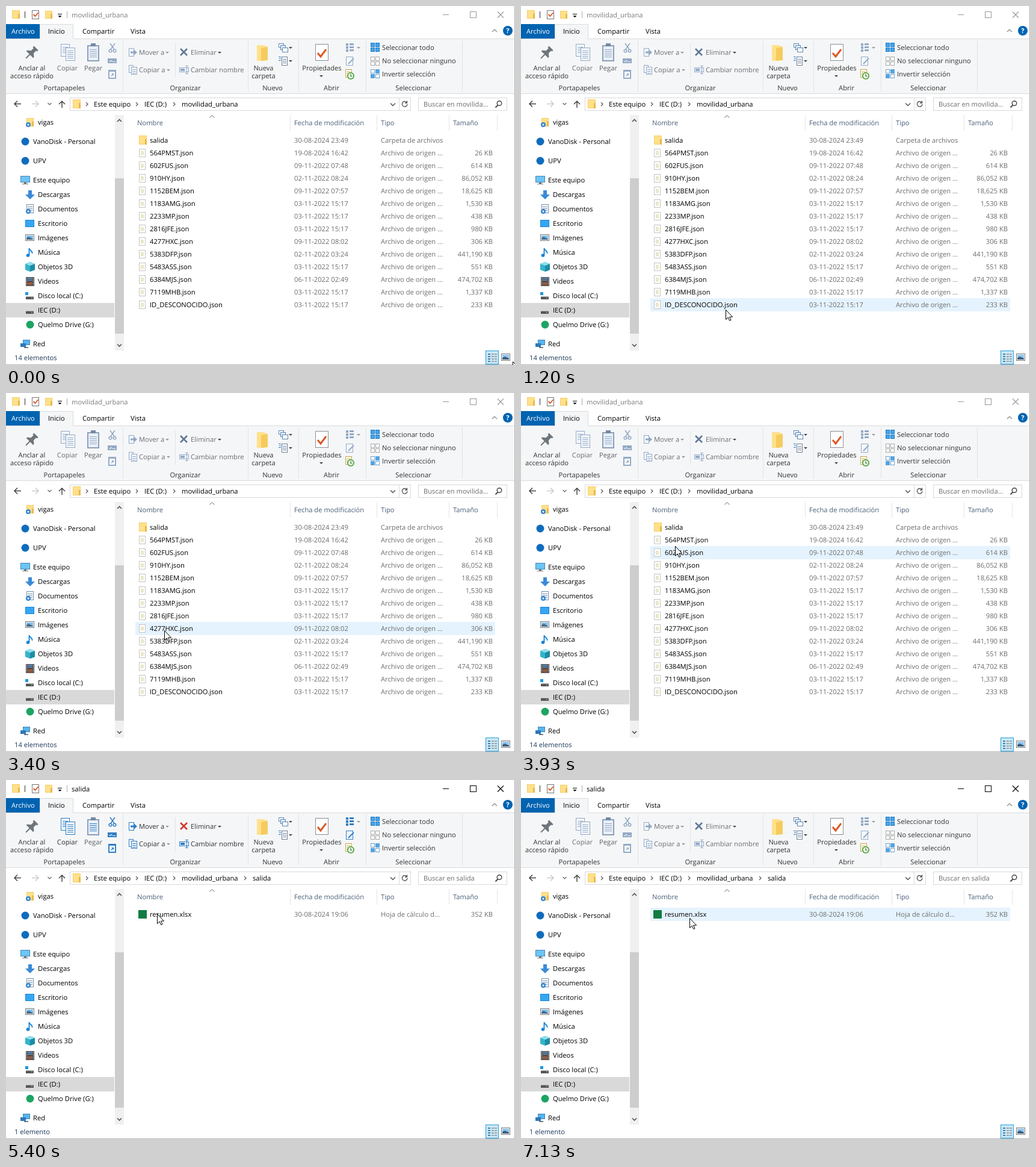
Recreate the animation shown at these times as an HTML page. Size 846x596 px, loop 8000 ms.

```html
<!DOCTYPE html>
<html lang="es">
<head>
<meta charset="utf-8">
<title>Explorador</title>
<style>
  html, body { margin: 0; width: 100%; height: 100%; overflow: hidden; background: #fff; }
  svg { display: block; width: 846px; height: 596px; }
  text { font: 11.2px "Open Sans", "Noto Sans", sans-serif; fill: #000; text-rendering: geometricPrecision; white-space: pre; }
  .rib text { fill: #333; }
  .rib .op { color: #2f7fc4; }
  .rib .del { color: #d5382c; }
  .off .op { color: #93a9c6; }
  .off .op text { fill: #6a6f76; }
  .off .del { color: #5f7896; }
  .head text { fill: #4c607a; }
  .dim { fill: #6d6d6d; }
  .chrome { color: #999; }
  .active .chrome { color: #000; }
  .chrome text { fill: #7c7c7c; }
  .active .chrome text { fill: #000; }
</style>
</head>
<body>
<svg id="stage" viewBox="0 0 846 596" xmlns="http://www.w3.org/2000/svg"></svg>
<script>
const R = (x, y, w, h, fill, extra = '') => `<rect x="${x}" y="${y}" width="${w}" height="${h}" fill="${fill}" ${extra}/>`;
const B = (x, y, w, h, stroke, fill = 'none') => R(x + .5, y + .5, w - 1, h - 1, fill, `stroke="${stroke}"`);
const L = (d, stroke, width = 1) => `<path d="${d}" fill="none" stroke="${stroke}" stroke-width="${width}"/>`;
const F = (d, fill) => `<path d="${d}" fill="${fill}"/>`;
const C = (x, y, r, fill) => `<circle cx="${x}" cy="${y}" r="${r}" fill="${fill}"/>`;
const O = (x, y, r, stroke, width) => `<circle cx="${x}" cy="${y}" r="${r}" fill="none" stroke="${stroke}" stroke-width="${width}"/>`;
const T = (x, y, s, extra = '') => `<text x="${x}" y="${y}" ${extra}>${s}</text>`;
const M = (x, y, s) => T(x, y, s, 'text-anchor="middle"');
const G = (cls, s) => `<g class="${cls}">${s}</g>`;
const drop = (x, y, c = '#444') => F(`M${x - 3} ${y}h6l-3 3z`, c);
const chevron = (x, y) => L(`M${x - 2} ${y - 3}l3 3l-3 3`, '#555', 1.2);
const folder = (x, y, w, h) =>
  R(x, y, w, h, '#f7ce63') + R(x + 1, y + 1, w - 2, h - 2, '#ffe08c') + F(`M${x + w} ${y + h}v${-h * .6}h-3v${h * .6}z`, '#e9b94a');
const sheet = (x, y, w, h, c) => B(x, y, w, h, c, '#fff') +
  L(`M${x + 2} ${y + 4.5}h${w - 4}m0 3h${4 - w}m0 3h${w - 4}`, c);

function titleBar() {
  return folder(10, 7, 13, 14) + L('M31.5 9v11', '#333') +
    B(43, 7, 12, 15, '#777', '#fff') + L('M45.5 14l3 3l5-6', '#d9552b', 1.8) +
    folder(65, 8, 12, 13) + L('M86 13.5h7', '#000') + drop(89.5, 16, '#000') + L('M101.5 9v11', '#aaa') +
    G('chrome', `<text id="title" x="109" y="19"></text>` +
      L('M726 14.5h10', 'currentColor') + B(771, 9, 11, 11, 'currentColor') + L('M817 9.5l10 10m0-10l-10 10', 'currentColor', 1.1));
}

function tabs() {
  return R(0, 54, 845, 92, '#f5f6f7') + L('M0 54.5h845M0 145.5h845', '#dadbdc') +
    R(0, 30, 56, 24, '#0063b1') + T(9, 46, 'Archivo', 'style="fill:#fff"') +
    R(56, 30, 56, 26, '#f5f6f7') + L('M56.5 54v-23.5h55v24', '#dadbdc') +
    T(70, 46, 'Inicio') + T(127, 46, 'Compartir') + T(207, 46, 'Vista') +
    L('M808 43l4-4l4 4', '#888', 1.2) + C(834, 41, 8, '#0063b1') +
    T(834, 45, '?', 'text-anchor="middle" style="fill:#fff;font-weight:700"');
}

function ribbon() {
  const cur = 'currentColor';
  const page = (x, y, w, h) => R(x, y, w, h, '#f4f8fc', `stroke="${cur}"`);
  const lines = (x, y, w, n) => L(Array.from({ length: n }, (_, i) => `M${x} ${y + i * 3}h${w}`).join(''), cur);
  let s = L('M194.5 57v85M402.5 57v85M486.5 57v85M598.5 57v85M758.5 57v85M281.5 62v57', '#e2e3e4');
  [[97, 'Portapapeles'], [298, 'Organizar'], [443, 'Nuevo'], [541, 'Abrir'], [677, 'Seleccionar']]
    .forEach(([x, t]) => s += M(x, 140, t));
  // Clipboard
  s += `<g transform="translate(43 77) rotate(45)">` + F('M-5-10h10v3h-2v6l5 4v2h-7v9h-2v-9h-7v-2l5-4v-6h-2z', '#6d757c') + '</g>';
  s += M(43, 107, 'Anclar al') + M(43, 120, 'acceso rápido');
  s += G('op', page(91.5, 63.5, 14, 20) + lines(94, 68.5, 9, 4) + page(99.5, 69.5, 15, 21) + lines(102, 74.5, 10, 5) + M(102, 107, 'Copiar'));
  s += G('op', R(136, 66, 18, 25, '#eaf0f7', 'stroke="#8ba0bb" stroke-width="2"') + R(141, 62, 8, 5, '#7389a5') + lines(139, 72.5, 12, 5)) +
    T(145, 107, 'Pegar', 'text-anchor="middle" style="fill:#5d6166"');
  s += G('op', L('M173 62l7 10M181 62l-7 10', cur, 1.5) + O(173.5, 74.5, 2.3, cur, 1.5) + O(180.5, 74.5, 2.3, cur, 1.5) +
    R(169, 87, 15, 8, cur) + L('M171 91l2 2l2-3l2 3M178 92.5h4', '#fff') +
    R(170, 106, 13, 15, cur) + R(172, 109, 9, 10, '#fff') + L('M174.5 116.5l4-4m-3 0h3v3', cur, 1.2));
  // Organise
  s += G('op', page(204.5, 70.5, 8, 13) + L('M207 77h7', cur, 3) + F('M213 72.5l5 4.5l-5 4.5z', cur) + T(221, 81, 'Mover a') + drop(268, 76, '#999') +
    page(204.5, 98.5, 7, 12) + page(208.5, 101.5, 9, 12) + lines(210, 105.5, 6, 3) + T(221, 110, 'Copiar a') + drop(270, 105, '#999'));
  s += G('op del', L('M290 71l11 11M301 71l-11 11', cur, 2.6)) + G('op', T(307, 81, 'Eliminar')) + drop(355, 76);
  s += G('op', page(288.5, 102.5, 15, 7) + R(290, 104, 7, 4, cur) + L('M298 99.5h5M300.5 99.5v13m-2.5 0h5', cur) + T(307, 110, 'Cambiar nombre'));
  // New, open
  s += F('M417 65h11l7 3v21l-7 2h-11z', '#ffe08c') + F('M424 70l11-2v22l-11 1z', '#f6cb5d') +
    M(428, 107, 'Nueva') + M(428, 120, 'carpeta');
  s += B(453, 62, 9, 7, '#5e87b3', '#fff') + B(456, 65, 9, 8, '#5e87b3', '#dcecfa') + B(459, 69, 10, 8, '#5e87b3', '#fff') + drop(473, 68) +
    sheet(458, 84, 10, 15, '#6b7f96') + L('M453 84.5h4m-3 3h3m-4 3h4', '#2f7fc4') + drop(473, 90);
  s += B(514, 63, 22, 28, '#8b8f94', '#fff') + L('M518 78l5 6l9-12', '#dd5a27', 3) + M(525, 107, 'Propiedades') + drop(524, 115);
  s += G('op', [62, 67, 72].map(y => R(565, y, 4, 4, cur) + R(571, y, 7, 3, cur)).join('') + drop(586, 68, '#999') +
    page(565.5, 84.5, 11, 14) + L('M569 96l9-9', cur, 2)) +
    sheet(564, 105, 11, 14, '#c5a64a') + C(573, 116, 6, '#58a846') + C(573, 116, 4.2, '#f2f8ee') + L('M573 113v3.5h2.5', '#387b2a', 1.2);
  // Select
  const tiles = (y, fill, line) => [0, 8].map(a => [0, 8].map(b => B(606 + a, y + b, 7, 7, line, fill(a, b))).join('')).join('');
  s += tiles(61, () => '#4aa5e8', '#1479c9') + tiles(84, () => '#fff', '#a8a8a8') + tiles(105, (a, b) => a === b ? '#fff' : '#4aa5e8', '#6ba4d3');
  s += T(625, 73, 'Seleccionar todo') + T(625, 95, 'No seleccionar ninguno') + T(625, 117, 'Invertir selección');
  return `<g id="ribbon" class="rib off">${s}</g>`;
}

function addressBar() {
  return L('M25 162.5h-11m5-5l-5 5l5 5', '#444', 1.5) + L('M43 162.5h11m-5-5l5 5l-5 5', '#ccc', 1.5) +
    L('M69.5 161l3 3l3-3', '#666', 1.2) + L('M93 169v-11m-5 5l5-5l5 5', '#444', 1.5) +
    B(106, 152, 567, 22, '#d9d9d9') + L('M653.5 153v20', '#d9d9d9') + folder(111, 155, 13, 15) +
    chevron(135, 163) + T(146, 167, 'Este equipo') + chevron(218, 163) + T(230, 167, 'IEC (D:)') +
    chevron(280, 163) + T(292, 167, 'movilidad_urbana') + `<g id="crumb">${chevron(398, 163)}${T(410, 167, 'salida')}</g>` +
    L('M639 161.5l4 4l4-4', '#555', 1.5) + L('M666 160a4.3 4.3 0 1 0 1 3M666.5 157.5v3.5h-3.5', '#555', 1.4) +
    B(685, 152, 148, 22, '#d9d9d9') + `<text id="search" class="dim" x="694" y="167"></text>` +
    O(820, 161.5, 3.8, '#444', 1.4) + L('M817.5 164.5l-4 4', '#444', 1.8);
}

function sidebar() {
  const drive = (x, y) => R(x, y + 3, 13, 5, '#555') + R(x, y + 3, 13, 1, '#aaa') + R(x + 9, y + 5, 2, 1, '#6f6');
  const photo = (x, y) => B(x, y, 15, 11, '#777', '#fff') + R(x + 2, y + 2, 11, 7, '#7fc0ee') + F(`M${x + 2} ${y + 9}v-3l4-2l7 4v1z`, '#476c8a');
  const screen = (x, y) => R(x, y, 15, 12, '#1683d8') + R(x + 1, y + 1, 13, 10, '#35a7f2');
  const items = [
    ['vigas', 193, 1, folder(34, 186, 12, 14) + C(37, 197, 4, '#3986cf') + C(37, 197, 1.5, '#fff')],
    ['VanoDisk - Personal', 225, 0, C(32, 225, 6.5, '#0f6cbd')],
    ['UPV', 257, 0, C(32, 257, 6.5, '#0f6cbd')],
    ['Este equipo', 289, 0, B(24, 282, 16, 11, '#4687b5', '#6cc5f5') + R(30, 293, 4, 2, '#777') + R(27, 295, 10, 1, '#777')],
    ['Descargas', 313, 1, F('M37 306h6v7h5l-8 8l-8-8h5z', '#3b8ad8')],
    ['Documentos', 337, 1, sheet(34, 329, 12, 15, '#7590ab') + C(37, 341, 4, '#3986cf') + C(37, 341, 1.5, '#fff')],
    ['Escritorio', 361, 1, screen(32, 355)],
    ['Imágenes', 385, 1, photo(32, 379)],
    ['Música', 409, 1, L('M38.5 414v-12c0 4 6 4 5 9', '#1683d8', 1.8) + C(36.5, 414, 2.8, '#1683d8')],
    ['Objetos 3D', 433, 1, F('M40 425l8 3v10l-8 3l-8-3v-10z', '#34b4cb') + F('M40 431l8-3v10l-8 3z', '#1f8ba5') + F('M32 428l8-3l8 3l-8 3z', '#8fe0ec')],
    ['Videos', 457, 1, R(33, 450, 14, 15, '#444') + R(36, 451, 8, 6, '#5d8fc0') + R(36, 458, 8, 6, '#b5653f') +
      L('M34.5 451v13m11-13v13', '#ddd') + L('M34 453.5h12m-12 3h12m-12 3h12m-12 3h12', '#444')],
    ['Disco local (C:)', 481, 1, R(32, 475, 5, 5, '#1d9be3') + drive(33, 479)],
    ['IEC (D:)', 505, 1, drive(33, 503)],
    ['Quelmo Drive (G:)', 529, 1, C(40, 529, 6.5, '#1da462')],
    ['Red', 561, 0, B(28, 554, 12, 9, '#4687b5', '#55b5ef') + F('M24 560h9v6h-9z', '#2e78b8') + R(30, 566, 7, 2, '#6d7c88')]
  ];
  return R(0, 493, 180, 24, '#d9d9d9') + items.map(([t, y, deep, icon]) => icon + T(deep ? 53 : 45, y + 4, t)).join('') +
    R(181, 181, 15, 391, '#f0f0f0') + R(181, 286, 15, 258, '#cdcdcd') +
    L('M185 192l3.5-3.5l3.5 3.5M185 561.5l3.5 3.5l3.5-3.5', '#555', 1.6);
}

const ORIGIN = 'Archivo de origen ...';
const files = [
  ['salida', '30-08-2024 23:49', ''],
  ['564PMST', '19-08-2024 16:42', '26'],
  ['602FUS', '09-11-2022 07:48', '614'],
  ['910HY', '02-11-2022 08:24', '86,052'],
  ['1152BEM', '09-11-2022 07:57', '18,625'],
  ['1183AMG', '03-11-2022 15:17', '1,530'],
  ['2233MP', '03-11-2022 15:17', '438'],
  ['2816JFE', '03-11-2022 15:17', '980'],
  ['4277HXC', '09-11-2022 08:02', '306'],
  ['5383DFP', '02-11-2022 03:24', '441,190'],
  ['5483ASS', '03-11-2022 15:17', '551'],
  ['6384MJS', '06-11-2022 02:49', '474,702'],
  ['7119MHB', '03-11-2022 15:17', '1,337'],
  ['ID_DESCONOCIDO', '03-11-2022 15:17', '233']
];
const TOP = 212, STEP = 21;

function row(i, icon, name, date, type, size) {
  const y = TOP + STEP * i + 15;
  return icon + T(239, y, name) + T(479, y, date, 'class="dim"') + T(623, y, type, 'class="dim"') +
    (size && T(809, y, size + ' KB', 'class="dim" text-anchor="end"'));
}

function fileRow([name, date, size], i) {
  const y = TOP + STEP * i;
  if (!i) return row(i, folder(221, y + 3, 13, 15), name, date, 'Carpeta de archivos', '');
  const icon = B(221, y + 4, 11, 14, '#c4c4c4', '#fff') +
    T(226.5, y + 13, '{}', 'text-anchor="middle" style="font-size:7px;fill:#b5a52c"');
  return row(i, icon, name + '.json', date, ORIGIN, size);
}

function list() {
  return G('head" id="head', L('M472.5 181v26M616.5 181v26M736.5 181v26M816.5 181v26', '#e5e5e5') +
      L('M338.5 185.5l4-4l4 4', '#666') +
      T(218, 198, 'Nombre') + T(479, 198, 'Fecha de modificación') + T(623, 198, 'Tipo') + T(743, 198, 'Tamaño')) +
    '<rect id="mark" x="215" width="598" height="22"/>' +
    `<g id="outer">${files.map(fileRow).join('')}</g>` +
    `<g id="inner">${row(0, R(220, 216, 14, 14, '#107c41'), 'resumen.xlsx', '30-08-2024 19:06', 'Hoja de cálculo d...', '352')}</g>`;
}

function statusBar() {
  return `<text id="status" x="14" y="588" style="fill:#1e395b"></text>` +
    B(797, 572, 22, 23, '#26a0da', '#cbe8f6') +
    [578, 582, 586, 590].map(y => R(801, y - 1, 4, 2, '#4b7fa8') + L(`M807 ${y}h4m1 0h4`, '#666')).join('') +
    B(823, 577, 15, 12, '#777', '#fff') + R(825, 579, 11, 8, '#8cc5ee') + F('M825 587v-3l4-2l7 3v2z', '#3d5f7c') +
    L('M845.5 0v596M0 595.5h846', '#b5b5b5');
}

const stage = document.getElementById('stage');
stage.innerHTML = R(0, 0, 846, 596, '#fff') + titleBar() + tabs() + ribbon() + addressBar() + sidebar() + list() + statusBar() +
  '<path id="cursor" d="M.5.5v16l3.7-3.5l2.5 5.5l2.3-1l-2.4-5.3h5z" fill="#fff" stroke="#000"/>';

const ui = {};
stage.querySelectorAll('[id]').forEach(el => ui[el.id] = el);
const show = (el, on) => el.style.display = on ? '' : 'none';

// Pointer keys: time, x, y
const path = [
  [0, 842, 590], [400, 600, 440], [867, 430, 490], [1200, 340, 504], [1733, 295, 513], [1867, 291, 513],
  [2000, 291, 513], [2133, 286, 513], [2200, 286, 513], [2600, 273, 487], [3067, 267, 445], [3400, 263, 394],
  [3933, 256, 254], [4467, 251, 222], [5533, 251, 222], [6133, 297, 230], [6333, 306, 268], [6600, 306, 268],
  [7133, 280, 229], [8000, 280, 229]
];
const LOOP = 8000, TICK = 200 / 3;

function pointer(t) {
  const i = Math.max(1, path.findIndex(k => k[0] >= t));
  const [a, b] = [path[i - 1], path[i]];
  const p = (t - a[0]) / (b[0] - a[0]);
  return [1, 2].map(n => Math.round(a[n] + (b[n] - a[n]) * p));
}

function draw(ms) {
  const t = Math.min(Math.floor((ms + 4) / TICK) * TICK, LOOP);
  const [x, y] = pointer(t);
  const opened = t > 5300, loading = opened && t < 5390;
  const selected = t > 4790 && !opened;
  const hit = Math.floor((y - TOP) / STEP);
  const hover = x >= 215 && x < 813 && hit >= 0 && hit < (opened ? 1 : files.length) && !(opened && t < 5590);

  stage.classList.toggle('active', t > 4990);
  ui.ribbon.classList.toggle('off', t < 4990 || t > 5590);
  ui.title.textContent = opened ? 'salida' : 'movilidad_urbana';
  ui.search.textContent = opened ? 'Buscar en salida' : 'Buscar en movilida...';
  ui.status.textContent = opened ? '1 elemento' : '14 elementos';
  show(ui.crumb, opened);
  show(ui.head, !loading);
  show(ui.outer, !opened);
  show(ui.inner, opened && !loading);

  show(ui.mark, selected || hover);
  ui.mark.setAttribute('y', TOP + STEP * (selected ? 0 : hit) + (selected ? .5 : 0));
  ui.mark.setAttribute('x', selected ? 215.5 : 215);
  ui.mark.setAttribute('width', selected ? 597 : 598);
  ui.mark.setAttribute('height', selected ? 21 : 22);
  ui.mark.setAttribute('fill', selected ? '#cce8ff' : '#e5f3ff');
  ui.mark.setAttribute('stroke', selected ? '#99d1ff' : 'none');
  ui.cursor.setAttribute('transform', `translate(${x} ${y})`);
}

const start = performance.now();
function frame() {
  draw((performance.now() - start) % LOOP);
  requestAnimationFrame(frame);
}
frame();
</script>
</body>
</html>
```
